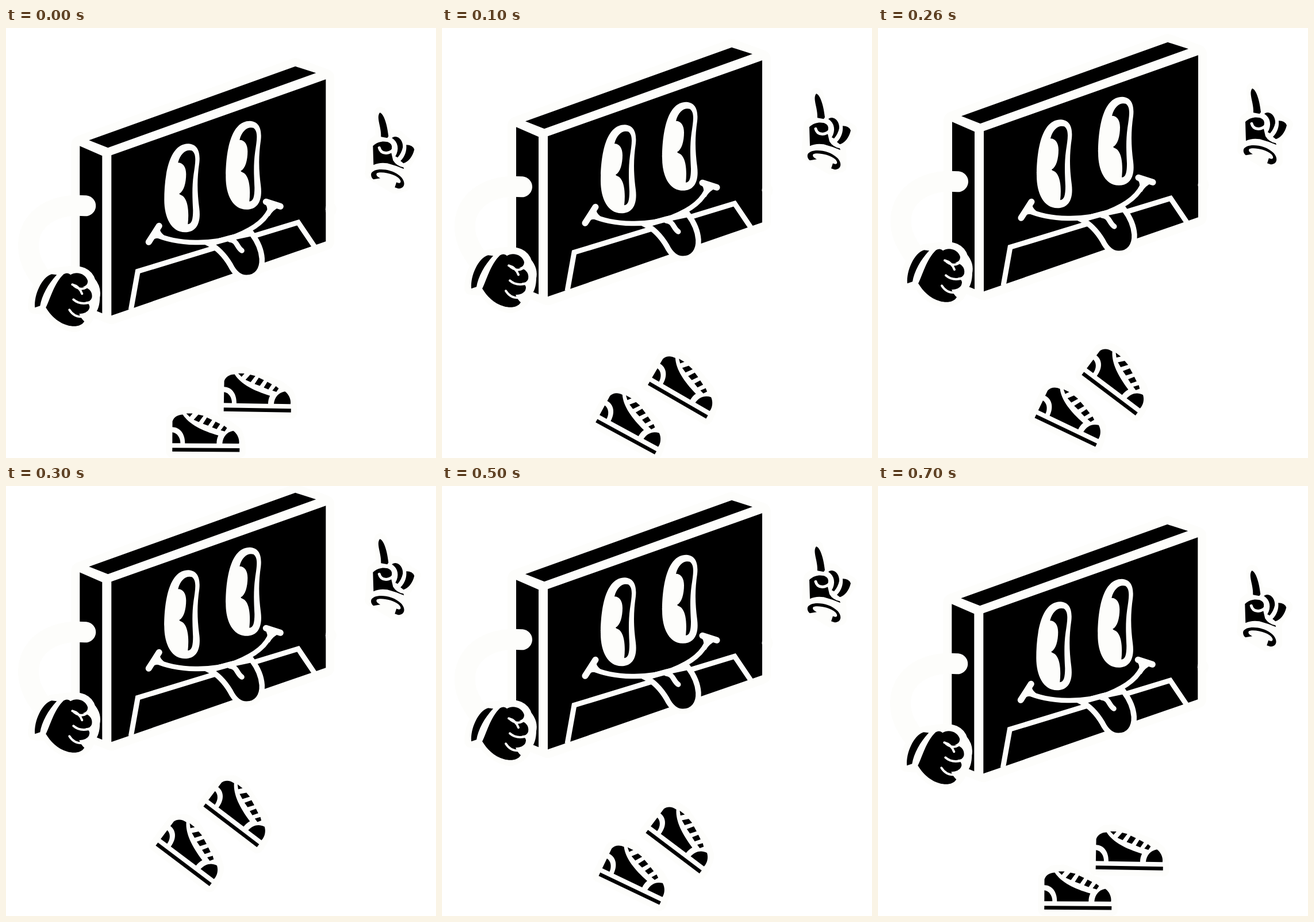
Animation of 748 by 748 pixels, one loop 0.8 s. Source, as an HTML page:

```html
<!DOCTYPE html>
<html lang="en">
<head>
<meta charset="utf-8">
<title>Jumping laptop</title>
<style>
  html, body { margin: 0; height: 100%; overflow: hidden; background: #fff; }
  svg { display: block; width: 100%; height: 100%; }
  .pale { fill: #fdfdfb; }
  .line { fill: none; stroke: #fdfdfb; stroke-linecap: round; }
  .halo { fill: #fdfdfb; stroke: #fdfdfb; stroke-width: 22; stroke-linejoin: round; }
  .wide { stroke-width: 30; }
</style>
</head>
<body>
<svg viewBox="0.7 0.7 748 748">
  <defs>
    <!-- Origin: top left corner of the sole -->
    <g id="shoe">
      <path class="halo" d="M0 6V-47L16 -60 33 -61 95 -38 110 -27Q116 -18 117 6Z"/>
      <path d="M0 0H117V6.5H0Z"/>
      <path d="M0 -27C8 -26 14 -18 14 -8H0Z"/>
      <path d="M0 -36V-46C2 -53 9 -58 18 -58C29 -41 52 -30 80 -22C78 -18 77 -13 77 -8H22C22 -26 12 -36 0 -36Z"/>
      <path d="M87 -8C88 -20 95 -28 106 -30C113 -25 117 -16 116 -8Z"/>
      <path d="M24 -60L35 -60 30 -54ZM37 -49L45 -58 54 -56 46 -45ZM53 -42L60 -53 69 -49 62 -39ZM69 -36L75 -46 83 -42 77 -33ZM84 -31L90 -39 95 -35 91 -29Z"/>
    </g>
    <g id="eye">
      <path class="pale" d="M318 202C334 203 339 216 337 235C333 262 333 285 337 315C340 340 332 356 312 356C288 356 276 330 276 300C276 260 283 202 318 202Z"/>
      <path d="M300 235C304 218 315 211 324 214C333 220 330 236 327 256C324 278 325 297 326 318C326 333 324 342 317 342C319 325 318 305 311 296C308 291 304 292 302 289C310 285 314 270 314 255C314 243 309 235 300 235Z"/>
    </g>
  </defs>

  <use id="right" href="#shoe"/>
  <use id="left" href="#shoe"/>

  <g id="body">
    <path class="halo wide" d="M129 203L504 68 557 87V372L184 501 150 488 129 470Z"/>
    <path d="M145 196L504 67.5 540 79 178 209Z"/>
    <path d="M129 206L168 223V497L129 481Z"/>
    <path d="M184 222L557 90V372L184 501Z"/>
    <ellipse class="pale" cx="566" cy="316" rx="9.5" ry="12"/>

    <!-- Panel -->
    <path class="line" style="stroke-linecap:butt" stroke-width="9" d="M218 491L230 424 509 339 538 382"/>

    <use href="#eye"/>
    <use href="#eye" x="107" y="-39.5"/>

    <!-- Tongue and mouth -->
    <path stroke="#fdfdfb" stroke-width="9.5" d="M354 376C370 384 382 398 391 413C398 427 408 435 419 435C437 435 447 421 446 402C445 386 437 370 428 358L390 366Z"/>
    <path class="line" stroke-width="9" d="M390 369C403 370 402 382 411 388"/>
    <path class="line" stroke-width="8.5" d="M258 359C300 378 360 378 400 363C435 349 455 333 463 309"/>
    <path class="line" stroke-width="11" d="M267 345L249 373M453 303L478 311"/>
    <path class="pale" d="M268 350Q270 359 280 364L272 368Q261 364 254 371ZM452 307Q458 316 453 325L459 328Q465 317 477 312Z"/>

    <!-- Arm and fist -->
    <path class="line" stroke-width="36" d="M139 310C80 305 36 335 40 385Q42 410 62 436"/>
    <path class="halo" d="M50 487C50 455 70 430 86 429L108 426Q140 422 146 443Q156 455 153 468Q153 485 146 492Q143 512 120 519Q90 515 73 488Z"/>
    <path d="M80 429C63 434 49 465 51 487L60 484C63 466 74 446 89 430Z"/>
    <path d="M70 487C77 474 84 445 101 429Q108 425 113 430C123 423 140 428 143 441Q143 449 134 451C145 452 152 460 150 470Q148 477 139 477Q149 482 145 490Q142 497 128 498Q132 507 137 511C132 520 119 521 108 518C90 513 78 500 70 487Z"/>
    <path class="line" stroke-width="4" d="M116 447Q128 450 133 463M119 449Q131 458 140 452M118 473Q128 482 143 479M111 491Q119 504 134 503"/>

    <!-- Pointing hand -->
    <path class="halo" d="M652 149L663 187 681 189 700 205 711 211 692 240 693 274 677 278 636 254 640 203 655 192Z"/>
    <path d="M651 148C656 149 663 162 666 189L664 192 653 190C654 173 644 156 651 148Z"/>
    <path d="M639 206C648 197 660 197 668 200Q675 207 670 214L674 231Q680 241 692 243L693 246Q679 240 664 236Q650 234 640 239Z"/>
    <path class="line" stroke-width="5" d="M650 209C653 220 666 221 675 212M668 198Q680 203 677 216"/>
    <path d="M672 192C681 185 692 196 691 208Q689 218 682 226L678 224C685 212 683 199 672 192Z"/>
    <path d="M697 204Q708 204 711 212C708 225 700 234 692 236L687 232C695 224 698 214 697 204Z"/>
    <path d="M636 254C640 243 672 244 688 260C697 270 694 280 683 280L677 278 680 269C687 273 690 268 684 262C674 253 652 250 646 253C643 257 648 260 652 262L640 264C637 262 635 258 636 254Z"/>
  </g>
</svg>
<script>
  // Each pose: body shift, then x, y and angle of the right and left shoe
  const poses = [
    { body: [0, 0], right: [379.5, 661, 1], left: [290, 731, 0.3] },
    { body: [0.7, -33], right: [362, 616, 30], left: [271, 681, 28.5] },
    { body: [0.7, -42], right: [359, 599, 37], left: [276, 673, 25.5] },
    { body: [0, -55], right: [348, 553, 37.3], left: [265, 621, 37] }
  ];
  const order = [0, 1, 2, 3, 3, 2, 1, 0];
  const part = id => document.getElementById(id);

  function place(id, [x, y, angle = 0]) {
    part(id).setAttribute("transform", `translate(${x} ${y}) rotate(${angle})`);
  }

  function draw() {
    const step = Math.floor(performance.now() % 800 / 100);
    const pose = poses[order[step]];
    for (const id in pose) place(id, pose[id]);
    requestAnimationFrame(draw);
  }
  draw();
</script>
</body>
</html>
```
